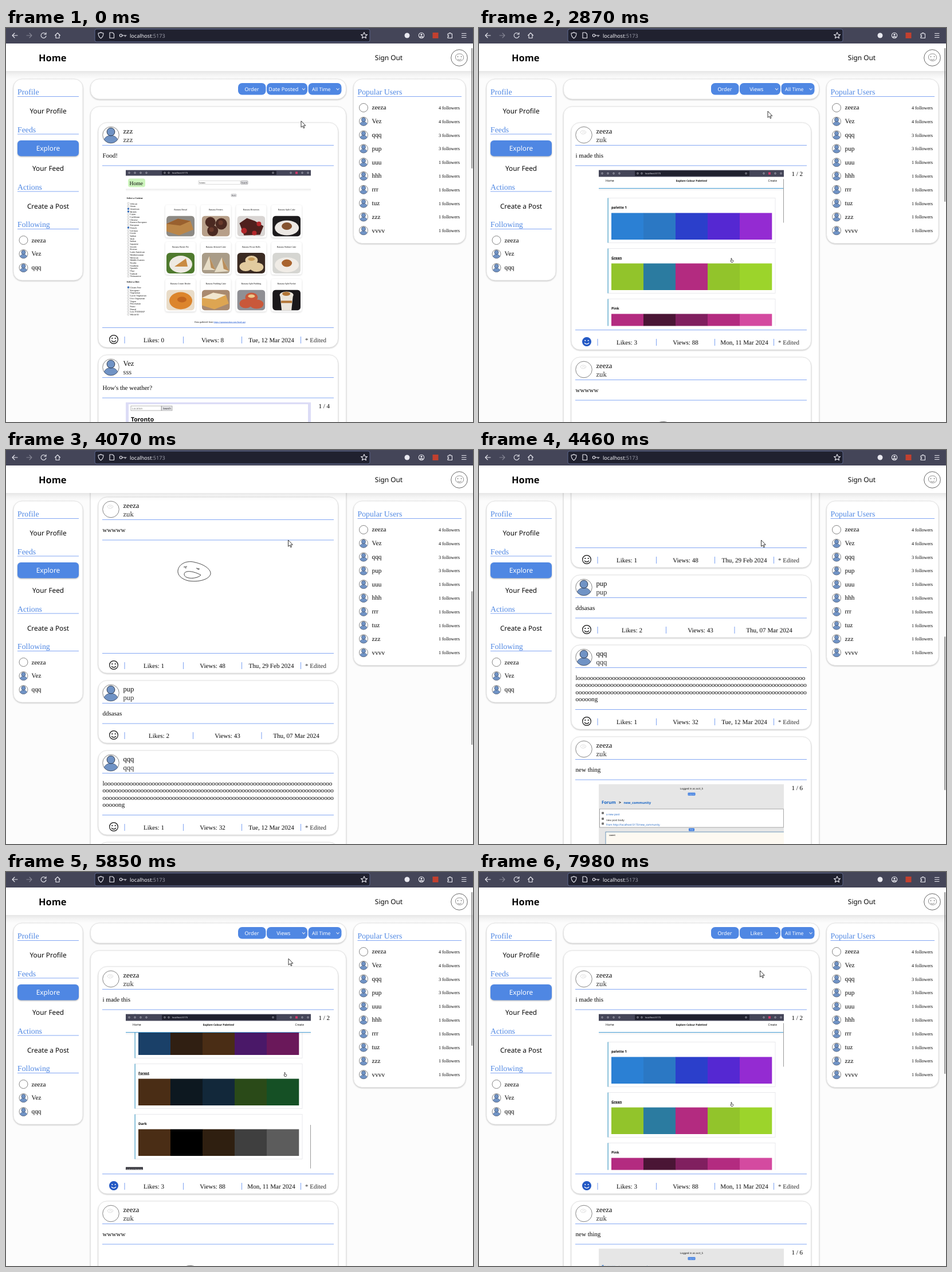
Recreate the animation shown at these times as an HTML page. Size 815 by 687 pixels, loop 8000 ms.

```html
<!DOCTYPE html>
<html lang="en">
<head>
<meta charset="utf-8">
<title>Home</title>
<style>
html, body { margin: 0; width: 100%; height: 100%; overflow: hidden; background: #fcfcfc; }
svg { display: block; }
text { font-family: "Liberation Serif", serif; white-space: pre; text-rendering: geometricPrecision; }
.n { font-family: "Noto Sans", "Open Sans", sans-serif; }
.b { font-weight: 700; }
.m { text-anchor: middle; }
.e { text-anchor: end; }
.card { fill: white; stroke: #e3e3e3; stroke-width: 1; filter: drop-shadow(0 1px 1px rgb(0 0 0 / .22)); }
.tile { fill: white; filter: drop-shadow(0 1px 1.5px rgb(0 0 0 / .16)); }
.rule { stroke: #84a7f3; stroke-width: 1.1; }
.icon { fill: none; stroke: #e9e9f0; stroke-width: 1.1; stroke-linecap: round; stroke-linejoin: round; }
.pen { fill: none; stroke: #333; stroke-width: .9; }
.photo { clip-path: inset(0 round 6px); }
</style>
</head>
<body>
<svg id="stage" width="815" height="687" viewBox="0 0 815 687"></svg>
<script>
const BLUE = '#4f87e3', LOOP = 8000;

// Drawing helpers
const T = (x, y, s, size, cls = '', fill = '#080808') =>
  `<text x="${x}" y="${y}" font-size="${size}" class="${cls}" fill="${fill}">${s}</text>`;
const R = (x, y, w, h, fill, rx = 0, more = '') =>
  `<rect x="${x}" y="${y}" width="${w}" height="${h}" rx="${rx}" fill="${fill}" ${more}/>`;
const C = (x, y, r, fill, more = '') => `<circle cx="${x}" cy="${y}" r="${r}" fill="${fill}" ${more}/>`;
const E = (x, y, rx, ry, fill) => `<ellipse cx="${x}" cy="${y}" rx="${rx}" ry="${ry}" fill="${fill}"/>`;
const P = (d, cls = 'icon', more = '') => `<path d="${d}" class="${cls}" ${more}/>`;
const F = (d, fill) => `<path d="${d}" fill="${fill}"/>`;
const card = (x, y, w, h, rx = 15) => R(x, y, w, h, 'white', rx, 'class="card"');
const rule = (x1, x2, y) => P(`M${x1} ${y}H${x2}`, 'rule');
const G = (x, y, body, more = '') => `<g transform="translate(${x} ${y})" ${more}>${body}</g>`;
const pane = (y, h, body) => `<svg x="209" y="${y}" width="323" height="${h}">${body}</svg>`;

function avatar(x, y, r, plain) {
  const k = r / 14.5;
  const disc = C(0, 0, 14.5, 'white', `stroke="#666" stroke-width="${.8 / k}"`);
  const scribble = k > .8 ? P('M-6-5C-5-9 3-8 4-5C3-1-5 0-6-5M-3-4C-1-6 2-5 2-3', '', 'fill="none" stroke="#d5d5d5" stroke-width=".8"') : '';
  const person =
    `<path d="M-12 8C-9 2-4 1 0 1S9 2 12 8A14.5 14.5 0 0 1-12 8Z" fill="#7093c5" stroke="#40506c" stroke-width=".8"/>` +
    C(0, -5.5, 7, '#7093c5', 'stroke="#283448" stroke-width="1"');
  return `<g transform="translate(${x} ${y}) scale(${k})">${disc}${plain ? scribble : person}</g>`;
}

function smiley(x, y, liked) {
  const ink = liked ? 'white' : '#111';
  return G(x, y,
    C(0, 0, 7.4, liked ? '#2459c4' : 'white', `stroke="${liked ? '#2459c4' : '#111'}" stroke-width="1.2"`) +
    C(-2.7, -2, 1.1, ink) + C(2.7, -2, 1.1, ink) +
    P('M-4 2Q0 6.4 4 2', '', `fill="none" stroke="${ink}" stroke-width="1.2"`));
}

// Browser toolbar and page frame
function toolbar() {
  return R(0, 0, 815, 27, '#444558') + R(155, 2, 480, 22, '#20212f', 3, 'stroke="#5b668c"') +
    P('M20 13H11M15 9L11 13L15 17') +
    P('M36 13H45M41 9L45 13L41 17', 'icon', 'opacity=".4"') +
    P('M69 10A4.5 4.5 0 1 0 70 14M70 8V11H66.5') +
    P('M85.5 13L90 8.5L94.5 13M87 12V17.5H93V12') +
    P('M161 9Q164 9 165.5 7.5Q167 9 170 9Q170 15 165.5 18Q161 15 161 9Z') +
    P('M181 8H186L188.5 10.5V17.5H181Z') +
    P('M202.5 13H210M208 13V15') + C(200.5, 13, 2.2, 'none', 'class="icon"') +
    T(216, 16.5, 'localhost<tspan fill="#9a9ba8">:5173</tspan>', 9.1, 'n', '#f4f4f8') +
    P('M625 7.5L626.7 11.2L630.5 11.5L627.6 14L628.5 17.8L625 15.8L621.5 17.8L622.4 14L619.5 11.5L623.3 11.2Z') +
    C(700, 13, 4.5, '#e9e9f0') +
    C(725, 13, 4.7, 'none', 'class="icon"') + C(725, 11.5, 1.6, '#e9e9f0') + P('M722 16Q725 12.5 728 16Z') +
    R(744.5, 8, 10, 10, '#c2402f') +
    P('M771 10H773.5V8.5H776V10H778.5V17.5H771V15H772.5V13H771Z') +
    P('M795.5 9.5H803M795.5 13H803M795.5 16.5H803');
}

function nav() {
  return R(0, 75, 815, 14, 'url(#shade)') + R(0, 27, 815, 48, 'white') +
    T(57, 58, 'Home', 16.4, 'n b') + T(668, 56, 'Sign Out', 11.9, 'n m') +
    C(791, 52, 14.3, 'white', 'stroke="#555" stroke-width=".9"') +
    P('M784.5 52C784 46 788 45 792 45C797 45 799 49 798.5 53C797 59 786 59 784.5 52M788 54.5Q791.5 57 795 54', 'pen', 'opacity=".6"') +
    C(788.5, 50, .8, '#444') + C(794.5, 50, .8, '#444');
}

const heading = (x, x2, y, s) => T(x, y, s, 13.8, '', BLUE) + rule(x, x2, y + 3.5);

function leftSide() {
  const item = (y, s, fill) => T(73.5, y, s, 11.8, 'n m', fill);
  return card(13, 89, 121, 351) +
    heading(20, 127, 116, 'Profile') + item(149, 'Your Profile') +
    heading(20, 127, 181.5, 'Feeds') +
    R(20, 196, 107, 27.5, BLUE, 6, 'style="filter:drop-shadow(0 1px 1px rgb(0 0 0 / .3))"') +
    item(214, 'Explore', 'white') + item(249, 'Your Feed') +
    heading(20, 127, 281.5, 'Actions') + item(314.5, 'Create a Post') +
    heading(20, 127, 347, 'Following') +
    ['zeeza', 'Vez', 'qqq'].map((s, i) =>
      avatar(30.5, 370 + 24 * i, 7.5, !i) + T(44.5, 373.5 + 23.8 * i, s, 11.3)).join('');
}

function rightSide() {
  const people = ['zeeza', 'Vez', 'qqq', 'pup', 'uuu', 'hhh', 'rrr', 'tuz', 'zzz', 'vvvv'];
  return card(606.5, 89, 195.5, 286.5) + heading(613.5, 795, 116, 'Popular Users') +
    people.map((s, i) => {
      const y = 139 + 23.8 * i, n = i < 2 ? 4 : i < 4 ? 3 : 1;
      return avatar(624, y, 7.5, !i) + T(638.5, y + 3.3, s, 11.3) + T(792, y + 3, `${n} followers`, 8.2, 'e');
    }).join('');
}

function sortBar() {
  const chev = x => P(`M${x - 2.2} 105.5L${x} 108L${x + 2.2} 105.5`);
  const pill = (x, w) => R(x, 96, w, 20.5, BLUE, 7);
  return card(147.5, 89, 446, 35) + pill(405, 48.5) + pill(455, 71) + pill(527.5, 58) +
    T(429, 110, 'Order', 9, 'n m', 'white') +
    `<text id="sort" x="484.3" y="110" font-size="9.1" class="n m" fill="white"></text>` +
    T(550.3, 110, 'All Time', 8.7, 'n m', 'white') + chev(519.5) + chev(579);
}

// Pictures inside posts, in coordinates local to the picture
function miniBrowser(h) {
  return R(0, 0, 323, h, '#444558') + R(63, 1.5, 200, h - 3, '#20212f', 1) +
    T(81, h / 2 + 1.6, 'localhost:5173', 4, 'n', '#e8e8f0') +
    [6, 16, 26, 36, 68, 75, 257, 288, 308, 318].map(x => C(x, h / 2, 1.3, 'none', 'stroke="#e0e0e8" stroke-width=".6"')).join('') +
    R(296, h / 2 - 2, 4, 4, '#d2386a');
}

const PALETTES = [
  ['palette 1', '#2b80d4', '#2b78c4', '#2b3fcb', '#5528d2', '#942bd2'],
  ['Green', '#92c42b', '#2b7ba0', '#b32b80', '#92c42b', '#9cd42b'],
  ['Pink', '#b32b80', '#4a1535', '#801f5f', '#b32b80', '#d44aa0'],
  ['zuk', '#153045', '#152d3a', '#152040', '#1d154a', '#35154a'],
  ['Purple', '#5c3585', '#1f152a', '#432758', '#5c3585', '#7c4ab5'],
  ['Ocean', '#1a4068', '#12283a', '#1a6a80', '#2b7ba0', '#153045'],
  ['Night', '#1a4068', '#301f12', '#4a2d15', '#4a1868', '#6a185a'],
  ['Forest', '#4a2d15', '#0d1820', '#12283a', '#2a4a18', '#155025'],
  ['Dark', '#4a2d15', '#000000', '#2f1f10', '#3f3f3f', '#5c5c5c']
];

function palettePage(y) {
  const rows = PALETTES.map(([name, ...colors], i) => G(0, 49 + 88 * i,
    R(16, 0, 292, 78, 'white', 0, 'stroke="#e4e4e8" stroke-width=".8"') + R(15.5, 0, 1.3, 78, '#58a9cc') +
    T(22, 18, name, 6.1, 'n b title') +
    colors.map((c, k) => R(22 + 56 * k, 26, 56.3, 46.5, c)).join(''))).join('');
  return pane(y, 272, R(0, 0, 323, 272, 'white') + `<g class="rows">${rows}</g>` +
    R(0, 32, 323, 5, 'url(#shade)') + R(0, 11, 323, 21, 'white') + R(0, 31.5, 323, 1.1, '#55a8dc') + miniBrowser(12) +
    T(12, 20, 'Home', 5.2, 'n') + T(162, 20, 'Explore Colour Palettes!', 4.6, 'n b m') + T(311, 20, 'Create', 5, 'n e') +
    `<rect class="bar" x="322" y="16" width="1.2" height="76" fill="#999"/>` +
    `<g class="tip">${R(0, 267, 30, 5, '#35353c') + T(1, 271, 'localhost:5173/palettes', 2.6, 'n', 'white')}</g>` +
    `<g class="hand">${P('M-1 3V-2H0V1L3 2L2 5H-1L-2 2Z', '', 'fill="white" stroke="#222" stroke-width=".7"')}</g>`);
}

// Plated food, 49 x 36, from a few flat shapes
const slab = (a, b) => F('M0 14L20 5L42 9L47 24L22 34L0 27Z', a) + F('M0 14L20 5L42 9L24 17Z', b);
const balls = (a, b) => C(15, 11, 9, a) + C(34, 14, 10, a) + C(19, 26, 9.5, a) + C(33, 12, 4, b) + C(17, 24, 4, b);
const chunks = (a, b) => F('M4 13L17 4L31 9L46 18L40 33L12 34Z', a) + C(12, 26, 5, b) + C(38, 14, 4, b) + C(30, 30, 4, b);
const plate = (a, b) => E(25, 21, 21, 13, a) + E(25, 18, 9, 6.5, b);
const wedge = (a, b) => E(25, 20, 20, 15, a) + F('M14 24L34 10L37 24Z', b);
const cones = (a, b) => F('M2 30L13 6L24 30Z', a) + F('M22 34L35 8L48 32Z', a) + F('M13 6L24 30L16 26Z', b) + F('M35 8L48 32L38 28Z', b);
const rolls = (a, b) => E(15, 24, 11, 8, a) + E(34, 25, 12, 8, a) + E(25, 13, 11, 8, a) + E(25, 11, 6, 3, b);
const bowl = (a, b) => E(25, 19, 20, 15, a) + E(27, 17, 8, 5, b);
const glass = (a, b) => F('M13 8H36L33 36H16Z', a) + E(24.5, 9, 12, 6, a) + E(24, 7, 7, 3.5, b) + R(15, 19, 19, 4, b);

const DISHES = [
  ['Banana Bread', slab, '#8d8a85', '#bb8648', '#99602f'], ['Banana Fritters', balls, '#b79f89', '#4b2921', '#6a3a2c'],
  ['Banana Brownies', chunks, '#d9d5d3', '#4f201d', '#b3262a'], ['Banana Split Cake', plate, '#1d1b1d', '#ece8e4', '#84522f'],
  ['Banana Butter Pie', wedge, '#4f7a2e', '#eeeae2', '#c98b42'], ['Banana Almond Cake', cones, '#a99c88', '#e6dcc6', '#b98e5c'],
  ['Banana Pecan Rolls', rolls, '#3b2b23', '#e2cb9f', '#c79a58'], ['Banana Walnut Cake', plate, '#d6d6d2', '#f0ece6', '#a9642f'],
  ['Banana Cream Brulee', bowl, '#e9dcc8', '#dc852c', '#c2661f'], ['Banana Pudding Cake', slab, '#a98a70', '#dda552', '#f1e6cf'],
  ['Banana Split Pudding', rolls, '#8f8f94', '#c9583a', '#ecc98c'], ['Banana Split Parfait', glass, '#1a181b', '#ebe5dc', '#b27536']
];

function recipePage(y) {
  const list = (s, y0, on) => s.split(',').map((name, i) => {
    const yy = y0 + 4.7 * i;
    return R(3, yy - 3.2, 3, 3, on.includes(i) ? '#2a6fd0' : 'white', .5, 'stroke="#888" stroke-width=".4"') + T(7.5, yy, name, 4.1);
  }).join('');
  const kinds = 'African,Asian,American,British,Cajun,Caribbean,Chinese,Eastern European,European,French,German,Greek,Indian,Irish,Italian,Japanese,Jewish,Korean,Latin American,Mediterranean,Mexican,Middle Eastern,Nordic,Southern,Spanish,Thai,Turkish,Vietnamese';
  const diets = 'Gluten Free,Ketogenic,Vegetarian,Lacto-Vegetarian,Ovo-Vegetarian,Vegan,Pescetarian,Paleo,Primal,Low FODMAP,Whole30';
  const cards = DISHES.map(([name, dish, base, a, b], i) => G(71 + 61.7 * (i % 4), 63 + 64.5 * (i / 4 | 0),
    R(-2, -2, 53, 57, 'white', 4, 'class="tile"') + T(24.5, 7.5, name, 4, 'm') +
    G(0, 17, R(0, 0, 49, 36, base) + dish(a, b), 'class="photo"'))).join('');
  return pane(y, 270, R(0, 0, 323, 270, 'white') + R(0, 33, 323, 5, 'url(#shade)') + miniBrowser(10) +
    R(4, 15, 30, 15, '#cdf5bd', 4) + T(6.5, 26, 'Home', 9.6) +
    R(127, 19, 73, 6, 'white', 0, 'stroke="#a5a5a5" stroke-width=".4"') + T(128.5, 23.5, 'banana', 3.6) +
    R(201, 19, 12, 6, '#e0e0e4', 1, 'stroke="#777" stroke-width=".5"') + T(207, 23.5, 'Search', 3.6, 'm') +
    R(184, 42, 9, 4.6, '#e8e8ec', 1, 'stroke="#888" stroke-width=".4"') + T(188.5, 45.5, 'Back', 3.2, 'm') +
    T(1.5, 50.5, 'Select a Cuisine', 4.2, 'b') + list(kinds, 60, [2, 3, 9]) +
    T(1.5, 196.5, 'Select a Diet', 4.2, 'b') + list(diets, 206.5, [0]) + cards +
    T(120, 266, 'Data gathered from <tspan fill="#1a55d0" text-decoration="underline">https://spoonacular.com/food-api</tspan>', 4.2));
}

function weatherPage(y) {
  return pane(y, 300, R(0, 0, 323, 300, '#dcdcf6') + R(5, 3.5, 313, 300, 'white') +
    R(9, 6.5, 53, 8, 'white', 0, 'stroke="#888" stroke-width=".6"') + T(11, 12.5, 'Location', 4.6, 'n', '#777') +
    R(62.5, 6.5, 18.5, 8, '#e6e6ea', 0, 'stroke="#888" stroke-width=".6"') + T(72, 12.5, 'Search', 4.4, 'n m') +
    T(9, 33.5, 'Toronto', 10.3, 'n b'));
}

function forumPage(y) {
  const lines = [['a new post', 53, '#1c62c0'], ['new post body', 63, '#222'],
    ['from http://localhost:5173/new_community', 71.5, '#1c62c0']];
  return pane(y, 300, R(0, 0, 323, 300, '#e6e6e6') +
    T(162, 9.5, 'Logged in as acct_5', 4.4, 'n m') +
    R(155.5, 15, 13, 5, '#3f7ee0', 1) + T(162, 18.8, 'Log out', 3, 'n m', 'white') +
    T(5, 34.5, 'Forum', 7.6, 'n b', '#1463c4') + T(35, 34.5, '&gt;', 7, 'n b') +
    T(43.5, 34.5, 'new_community', 5.8, 'n b', '#1463c4') +
    R(1.5, 43.5, 321, 32, 'white', 0, 'stroke="#888" stroke-width=".7"') +
    lines.map(([s, yy, c]) => R(5, yy - 4.5, 4, 4, '#777', 1) + T(13, yy + 1, s, 4.6, 'n', c)).join('') +
    R(157, 77, 10, 5, '#3f7ee0', 1) + T(162, 80.8, 'Post', 3, 'n m', 'white') +
    R(12, 83.5, 312, 230, '#fdf9f1', 0, 'stroke="#4c7fae" stroke-width=".8"') + T(18, 90, 'sweet', 4, 'n'));
}

const face = y => G(0, y - 164.5,
  P('M300 210C302 197 318 192 330 196C345 199 358 208 357 216C355 226 335 231 318 228C306 225 299 218 300 210Z', 'pen') +
  P('M311 217C311 208 330 212 340 218C334 225 312 226 311 217Z', 'pen') +
  P('M310 204L316 203M312 205.5H315M332 206L338 207.5M334 208H337', 'pen'));

// Posts
function post(y, p) {
  const { h, name, sub, text, likes, views, date, edited, liked, media, pages } = p;
  const foot = y + h - 9.5;
  const seps = edited ? [207, 309.5, 411.5, 514.5] : [207, 326.5, 446];
  const mids = edited ? [258, 360.5, 463] : [267, 386.5, 506.5];
  return card(161, y, 418.5, h) + avatar(183, y + 21.5, 14.3, name === 'zeeza') +
    T(204.5, y + 19, name, 12.6) + T(204.5, y + 33.5, sub, 12.6, '', '#303030') + rule(168, 572, y + 39.5) +
    text.map((s, i) => T(168.5, y + 61 + 12.4 * i, s, 11.05)).join('') +
    rule(168, 572, y + 75 + 12.5 * (text.length - 1)) +
    (media ? media(y + 82.5) + rule(168, 572, y + h - 34.5) : '') +
    (pages ? T(565, y + 92.5, pages, 11, 'e') : '') +
    smiley(188, y + h - 14, liked) +
    seps.map(x => P(`M${x} ${foot - 9.5}V${foot + 2.5}`, 'rule')).join('') +
    [`Likes: ${likes}`, `Views: ${views}`, date].map((s, i) => T(mids[i], foot, s, 11.1, 'm')).join('') +
    (edited ? T(540.5, foot, '* Edited', 11, 'm', '#303030') : '');
}

const o = n => 'o'.repeat(n);
const recipes = { h: 392, name: 'zzz', sub: 'zzz', text: ['Food!'], likes: 0, views: 8, date: 'Tue, 12 Mar 2024', edited: 1, media: recipePage };
const weather = { h: 396, name: 'Vez', sub: 'sss', text: ["How's the weather?"], likes: 1, views: 20, date: 'Tue, 12 Mar 2024', media: weatherPage, pages: '1 / 4' };
const palettes = { h: 396, name: 'zeeza', sub: 'zuk', text: ['i made this'], likes: 3, views: 88, date: 'Mon, 11 Mar 2024', edited: 1, liked: 1, media: palettePage, pages: '1 / 2' };
const doodle = { h: 307, name: 'zeeza', sub: 'zuk', text: ['wwwww'], likes: 1, views: 48, date: 'Thu, 29 Feb 2024', edited: 1, media: face };
const short = { h: 109, name: 'pup', sub: 'pup', text: ['ddsasas'], likes: 2, views: 43, date: 'Thu, 07 Mar 2024' };
const long = { h: 147, name: 'qqq', sub: 'qqq', text: ['l' + o(72), o(73), o(73), o(5) + 'ng'], likes: 1, views: 32, date: 'Tue, 12 Mar 2024', edited: 1 };
const forum = { h: 396, name: 'zeeza', sub: 'zuk', text: ['new thing'], likes: 2, views: 30, date: 'Mon, 11 Mar 2024', edited: 1, media: forumPage, pages: '1 / 6' };

function feed(posts) {
  let y = 165;
  const body = posts.map(p => { const s = post(y, p); y += p.h + 13; return s; }).join('');
  return `<g class="feed">${card(147.5, 137, 446, posts.length ? y + 14 - 137 : 40)}${body}</g>`;
}

const stage = document.getElementById('stage');
stage.innerHTML =
  `<defs><linearGradient id="shade" x2="0" y2="1"><stop stop-opacity=".09"/><stop offset=".5" stop-opacity=".03"/><stop offset="1" stop-opacity="0"/></linearGradient></defs>` +
  R(0, 0, 815, 687, '#fcfcfc') +
  `<g id="scroll">${sortBar()}${feed([recipes, weather])}${feed([])}${feed([palettes, doodle, short, long, forum])}${feed([palettes, forum])}</g>` +
  leftSide() + rightSide() + nav() + toolbar() +
  `<rect id="thumb" x="812.3" width="1.7" rx=".8" fill="#858585"/>` +
  `<path id="cursor" d="M0 0V11.2L2.6 8.9L4.3 12.7L6 12L4.3 8.2H7.8Z" fill="white" stroke="#222" stroke-width=".9"/>`;

// Motion: [time, value...] rows, linear between rows
const SCROLL = [[3260, 0], [3460, 10], [3525, 10], [3590, 130], [3730, 130], [4070, 492], [4125, 492], [4450, 676], [5245, 676], [5320, 600], [5520, 600], [5820, 0]];
const CURSOR = [[270, 515, 162], [450, 512, 128], [660, 509, 108], [1400, 509, 108], [1740, 504, 145], [3000, 504, 145], [3440, 494.5, 155], [4000, 492.5, 157], [5520, 492.5, 157], [5800, 493, 151], [6380, 493, 151], [6600, 497, 108], [6800, 497, 108], [7000, 490, 164], [7640, 490, 167], [7950, 490.5, 172]];
const PAGE = [[3200, 0], [3440, 176], [3540, 176], [4700, 578], [7200, 578], [7200, 0]];
const HAND = [[3800, 232, 156], [4700, 278, 104], [7200, 278, 104], [7200, 232, 156]];
const FEEDS = [[0, 0], [2000, 1], [2410, 2], [7050, 1], [7380, 3]];
const SORTS = [[0, 'Date Posted'], [1880, 'Views'], [6980, 'Likes']];
const THUMBS = [210, 0, 268, 317];

const hold = (rows, t) => rows.filter(r => r[0] <= t).pop()[1];
function at(rows, t) {
  const i = rows.findIndex(r => r[0] > t);
  if (i < 0) return rows[rows.length - 1].slice(1);
  if (!i) return rows[0].slice(1);
  const [a, b] = [rows[i - 1], rows[i]], k = (t - a[0]) / (b[0] - a[0]);
  return a.slice(1).map((v, j) => v + (b[j + 1] - v) * k);
}

const all = s => [...stage.querySelectorAll(s)];
const [feeds, rows, bars, hands, tips, titles] = ['.feed', '.rows', '.bar', '.hand', '.tip', '.title'].map(all);
const [scroller, sort, thumb, cursor] = ['#scroll', '#sort', '#thumb', '#cursor'].map(s => stage.querySelector(s));
const move = (el, x, y) => el.setAttribute('transform', `translate(${x} ${y})`);
const show = (el, on) => { el.style.display = on ? '' : 'none'; };

function draw(t) {
  const [y] = at(SCROLL, t), [page] = at(PAGE, t), [hx, hy] = at(HAND, t), current = hold(FEEDS, t);
  move(scroller, 0, -y);
  move(cursor, ...at(CURSOR, t));
  sort.textContent = hold(SORTS, t);
  feeds.forEach((el, i) => show(el, i === current));
  thumb.setAttribute('y', 35 + y / 2.33);
  thumb.setAttribute('height', THUMBS[current]);
  rows.forEach(el => move(el, 0, -page));
  bars.forEach(el => move(el, 0, page * .307));
  hands.forEach(el => move(el, hx, hy));
  tips.forEach(el => show(el, page > 90));
  const hover = Math.floor((hy + page - 49) / 88);
  titles.forEach((el, i) => el.setAttribute('text-decoration', i % PALETTES.length === hover ? 'underline' : 'none'));
}

const start = performance.now();
function tick() {
  draw((performance.now() - start) % LOOP);
  requestAnimationFrame(tick);
}
tick();
</script>
</body>
</html>
```
